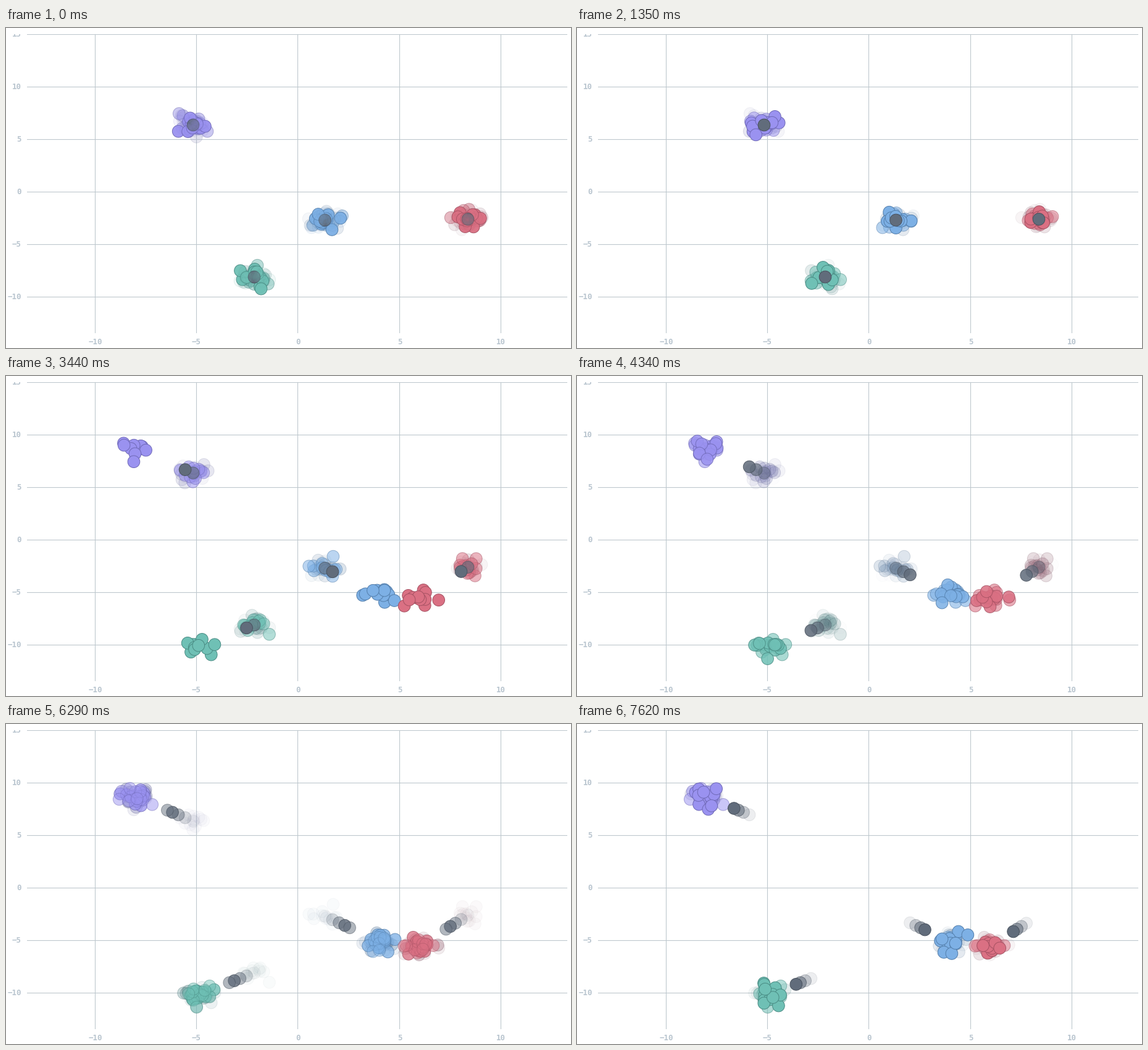
Recreate the animation shown at these times as a matplotlib script. Size 915 by 518 pixels, loop 8 s.

```python
import numpy as np
import matplotlib.pyplot as plt
from matplotlib.animation import FuncAnimation
from matplotlib.colors import to_rgb
from matplotlib.patches import Rectangle

W, H = 915, 518
LOOP, STEP = 8000, 20
REFRESH = 149.5                      # ms between redraws of the chart
PERIOD, LEAD, FADE = 1027, 30, 300   # ms between batches, head start, cross-fade
FIRST, LAST, JUMP = -4, 7, 3         # batch numbers; the clusters jump at JUMP
SIZE, SPREAD = 12, (13, 8)           # dots per cluster and batch, their scatter
DECAY = 0.862                        # how slowly a centre follows its cluster

# opacity by age: entering, newest, ..., gone
DOT_ALPHA = np.array([0, 1, .52, .18, .07, 0])
CENTRE_ALPHA = np.array([0, 1, .62, .32, .11, 0])

GREY, GREY_EDGE = to_rgb("#616c7b"), to_rgb("#4a535f")
GRID, LABEL = "#bfc8ce", "#b9c5cf"

# fill, edge, place before the jump, place after it
CLUSTERS = [
    ("#9a92f0", "#706ab8", (303, 157), (210, 118)),
    ("#7db0e5", "#5580ad", (516.5, 311), (606, 353)),
    ("#da7083", "#a65263", (748, 309.5), (669, 360)),
    ("#6fc0b5", "#4a8c84", (402, 403), (312, 438)),
]


def centre(start, goal, k):
    """Centre after batch k: it closes in on the new place geometrically."""
    start, goal = np.array(start), np.array(goal)
    return goal + (start - goal) * DECAY ** max(0, k - JUMP + 1)


def scatter(rng, mean):
    """One batch of dots, balanced around its mean."""
    dots = rng.normal(0, 1, (SIZE, 2)).clip(-2.3, 2.3)
    return mean + (dots - dots.mean(axis=0)) * SPREAD


def build():
    """All dots in drawing order, oldest batch first, centres above dots."""
    rng = np.random.default_rng(7)
    xy, fill, edge, batch, is_centre = [], [], [], [], []

    def add(points, face, line, k, mark):
        n = len(points)
        xy.extend(points)
        fill.extend([to_rgb(face)] * n)
        edge.extend([to_rgb(line)] * n)
        batch.extend([k] * n)
        is_centre.extend([mark] * n)

    for k in range(FIRST, LAST + 1):
        for face, line, start, goal in CLUSTERS:
            mean = np.array(start if k < JUMP else goal)
            add(scatter(rng, mean), face, line, k, False)
        for _, _, start, goal in CLUSTERS:
            add([centre(start, goal, k)], GREY, GREY_EDGE, k, True)
    return [np.array(a) for a in (xy, fill, edge, batch, is_centre)]


XY, FILL, EDGE, BATCH, IS_CENTRE = build()

fig = plt.figure(figsize=(W / 100, H / 100), dpi=100, facecolor="white")
ax = fig.add_axes([0, 0, 1, 1])
ax.set(xlim=(0, W), ylim=(H, 0))
ax.axis("off")


def px(n):
    return n * 0.72


def draw_grid():
    cols = {v: int(472.8 + 32.85 * v) + 0.5 for v in range(-10, 11, 5)}
    rows = {v: 265.5 - 17 * v for v in range(-10, 16, 5)}
    style = dict(colors=GRID, linewidths=px(1.1), zorder=1, snap=False)
    ax.vlines(list(cols.values()), 9.5, 494, **style)
    ax.hlines(list(rows.values()), 34, 909, **style)
    font = dict(family="DejaVu Sans Mono", weight="bold", size=px(12.5),
                color=LABEL, va="center", zorder=1)
    for v, x in cols.items():
        ax.text(x, 508, str(v).replace("-", "\u2212"), ha="center", **font)
    for v, y in rows.items():
        ax.text(25, y, str(v).replace("-", "\u2212"), ha="right", **font)
    ax.add_patch(Rectangle((0, 0), W, 9.5, color="white", lw=0, zorder=2))


draw_grid()
dots = ax.scatter([], [], s=px(19.6) ** 2, linewidths=px(1), zorder=3)


def fade(levels, age, p):
    """Opacity on the way from the previous age to this one."""
    top = len(levels) - 1
    before = levels[np.clip(age, 0, top)]
    after = levels[np.clip(age + 1, 0, top)]
    return np.where(age < 0, 0, before + (after - before) * p)


def update(i):
    now = (i + 1) * STEP - 1
    t = now // REFRESH * REFRESH + LEAD
    newest = int(t // PERIOD)
    p = min(1, (t - newest * PERIOD) / FADE)
    age = newest - BATCH

    alpha = np.where(IS_CENTRE, fade(CENTRE_ALPHA, age, p),
                     fade(DOT_ALPHA, age, p))
    # old dots lose half of their colour
    mix = 0.5 * np.clip(np.where(age == 2, 2 * p, age - 2), 0, 1)[:, None]
    seen = alpha > 0.005

    def tint(rgb, grey):
        mixed = rgb + (np.array(grey) - rgb) * mix
        return np.column_stack([mixed, alpha])[seen]

    dots.set_offsets(XY[seen])
    dots.set_facecolors(tint(FILL, GREY))
    dots.set_edgecolors(tint(EDGE, GREY_EDGE))
    return dots,


anim = FuncAnimation(fig, update, frames=LOOP // STEP, interval=STEP,
                     repeat=True, repeat_delay=0, blit=False)
plt.show()
```
